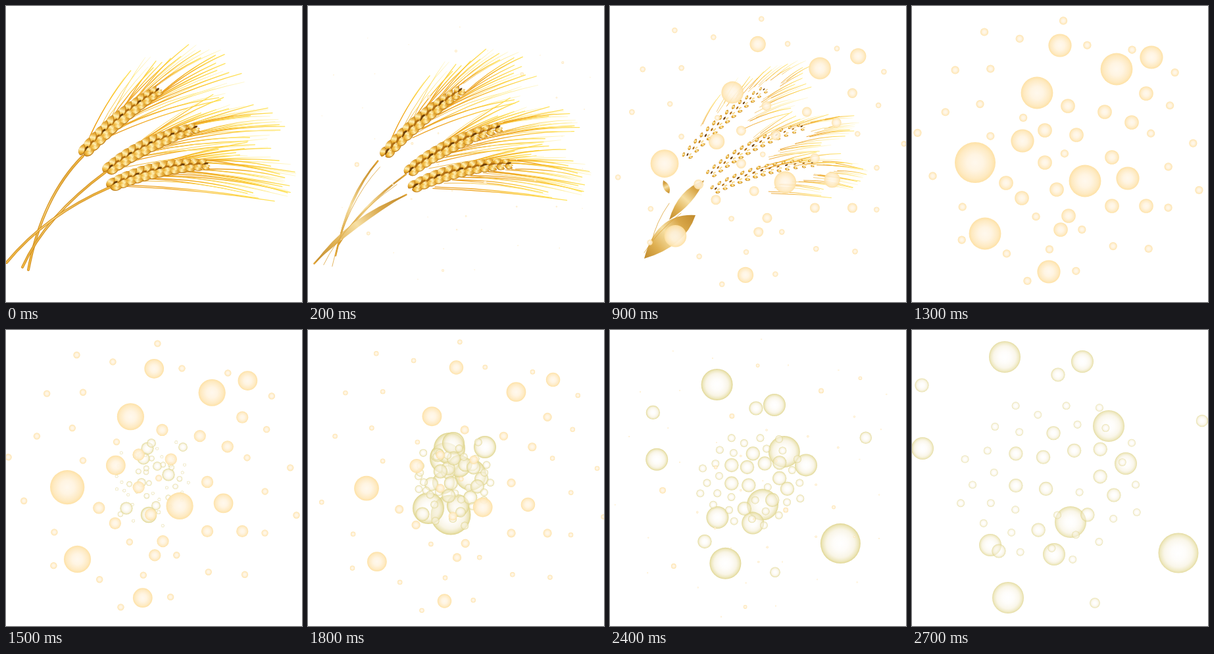
These frames come from a looping animation (450x450 px, 2.8 s). An HTML page with a canvas:

```html
<!DOCTYPE html>
<html>
<head>
<meta charset="utf-8">
<title>Wheat and bubbles</title>
<style>
html, body { margin: 0; width: 100%; height: 100%; overflow: hidden; background: #fff; }
canvas { display: block; }
</style>
</head>
<body>
<canvas id="stage" width="450" height="450"></canvas>
<script>
const ctx = document.getElementById('stage').getContext('2d');
const LOOP = 2800, STEP = 100;
const GOLDEN = Math.PI * (3 - Math.sqrt(5));

const lerp = (a, b, k) => a + (b - a) * k;
const clamp = v => Math.max(0, Math.min(1, v));
const quad = (a, c, b, k) => lerp(lerp(a, c, k), lerp(c, b, k), k);
const quadPoint = (p, k) => [quad(p[0], p[2], p[4], k), quad(p[1], p[3], p[5], k)];

// Piecewise linear interpolation; values run on past both ends.
function track(times, rows, t) {
  let i = 0;
  while (i < times.length - 2 && t > times[i + 1]) i++;
  const k = (t - times[i]) / (times[i + 1] - times[i]);
  return rows[i].map((v, j) => lerp(v, rows[i + 1][j], k));
}

function seeded(seed) {
  return () => {
    seed = (seed * 16807) % 2147483647;
    return seed / 2147483647;
  };
}

function radial(stops) {
  const g = ctx.createRadialGradient(0, 0, 0, 0, 0, 1);
  stops.forEach(([at, color]) => g.addColorStop(at, color));
  return g;
}

function linear(x0, y0, x1, y1, colors) {
  const g = ctx.createLinearGradient(x0, y0, x1, y1);
  colors.forEach((c, i) => g.addColorStop(i / (colors.length - 1), c));
  return g;
}

function bubble(x, y, r, fill) {
  if (r <= 0.1) return;
  ctx.save();
  ctx.translate(x, y);
  ctx.scale(r, r);
  ctx.fillStyle = fill;
  ctx.beginPath();
  ctx.arc(0, 0, 1, 0, Math.PI * 2);
  ctx.fill();
  ctx.restore();
}

// ---- wheat ----

// Axis of each ear (base, control, tip) and the arc on which its awns end.
const ears = [
  { axis: [116, 226, 170, 167, 232, 128], fan: [195, 72, 368, 34, 372, 132], seed: 11 },
  { axis: [152, 252, 209, 207, 290, 185], fan: [300, 135, 480, 160, 400, 218], seed: 29 },
  { axis: [157, 275, 224, 242, 306, 241], fan: [370, 200, 494, 275, 415, 298], seed: 47 }
];
const AWNS = 36, GRAINS = 13;

const grainFill = linear(-10, 2, 10, -2, ['#c98616', '#f0b83e', '#fff0b4', '#e9b040', '#d1901f']);

function leaf(length, width) {
  ctx.beginPath();
  ctx.moveTo(-length / 2, 0);
  ctx.bezierCurveTo(-length / 3, -width * 0.75, length / 5, -width * 0.7, length / 2, 0);
  ctx.bezierCurveTo(length / 5, width * 0.7, -length / 3, width * 0.75, -length / 2, 0);
  ctx.fill();
}

function axisPose(p, k) {
  const [x, y] = quadPoint(p, k);
  const dx = lerp(p[2] - p[0], p[4] - p[2], k);
  const dy = lerp(p[3] - p[1], p[5] - p[3], k);
  return { x, y, angle: Math.atan2(dy, dx) };
}

function stamp(pose, along, across, turn, scale, draw) {
  ctx.save();
  ctx.translate(pose.x, pose.y);
  ctx.rotate(pose.angle);
  ctx.translate(along, across);
  ctx.rotate(turn);
  ctx.scale(scale, scale);
  draw();
  ctx.restore();
}

function drawAwns(axis, ear, scale) {
  const rnd = seeded(ear.seed * 7919);
  for (let i = 0; i < AWNS; i++) {
    const v = clamp((i + rnd() * 0.9) / AWNS);
    const root = 0.2 + 0.8 * (1 - Math.abs(2 * v - 1));
    const pose = axisPose(axis, clamp(root + (rnd() - 0.5) * 0.3));
    const side = v < 0.5 ? -7 : 7;
    const x0 = pose.x - Math.sin(pose.angle) * side;
    const y0 = pose.y + Math.cos(pose.angle) * side;
    const end = quadPoint(ear.fan, v);
    const reach = 0.72 + rnd() * 0.32;
    const x1 = lerp(x0, end[0], reach), y1 = lerp(y0, end[1], reach);
    const mx = (x0 + x1) / 2, my = (y0 + y1) / 2;
    const bend = 0.02 + rnd() * 0.06;
    const at = (x, y) => [lerp(mx, x, scale), lerp(my, y, scale)];
    const a = at(x0, y0), b = at(x1, y1);
    const c = at(mx + (y1 - y0) * bend, my - (x1 - x0) * bend);
    const strong = rnd() < 0.4;
    ctx.strokeStyle = linear(a[0], a[1], b[0], b[1], strong
      ? ['#e99a18', '#f0a51e', '#fbc62d', '#ffe45c']
      : ['#eaa52a', '#f8c63a', '#ffe46a', '#fff8cf']);
    ctx.lineWidth = (strong ? 1.35 : 0.95) * (0.4 + 0.6 * scale);
    ctx.beginPath();
    ctx.moveTo(...a);
    ctx.quadraticCurveTo(...c, ...b);
    ctx.stroke();
  }
}

function drawGrains(axis, scale) {
  for (let i = GRAINS - 1; i >= 0; i--) {
    const k = (i + 0.6) / GRAINS;
    const pose = axisPose(axis, k);
    const taper = 0.62 + 0.38 * Math.sin(Math.PI * Math.min(1, k * 0.75 + 0.2));
    const size = scale * taper;
    stamp(pose, 2, -1, -0.25, size, () => {
      ctx.fillStyle = i % 3 ? '#b06d12' : '#6b3d08';
      leaf(15, 6);
    });
    for (const side of [-1, 1]) {
      stamp(pose, side * 2, side * 6.2 * taper, side * 0.42, size, () => {
        ctx.fillStyle = '#c17f17';
        leaf(21, 10.5);
        ctx.translate(0.4, -0.7);
        ctx.fillStyle = grainFill;
        leaf(19.5, 9);
      });
    }
    stamp(pose, 5, 2, 0.1, size, () => {
      ctx.fillStyle = grainFill;
      leaf(13, 6);
    });
  }
}

// Stems: start, control, end and bulge at each key time; finally they collapse.
const stemTimes = [0, 500, 900, 1300];
const stems = [
  [[117, 228, 55, 290, 34, 401, 1], [90, 247, 70, 285, 54, 347, 9], [81, 265, 86, 276, 90, 285, 9]],
  [[152, 252, 60, 320, 25, 397, 1], [144, 262, 110, 285, 75, 317, 9], [143, 265, 116, 290, 90, 325, 17]],
  [[157, 276, 60, 318, 1, 390, 1], [138, 303, 78, 338, 22, 394, 22], [130, 318, 92, 340, 52, 384, 34]]
];
const hairs = [
  [stems[0][0], [98, 270, 62, 315, 41, 388], [90, 300, 70, 328, 63, 360]],
  [stems[1][0], [110, 300, 50, 338, 22, 388], [108, 315, 70, 345, 52, 375]]
];
for (const keys of [...stems, ...hairs]) {
  const [x, y] = quadPoint(keys[2], 0.5);
  keys.push([x, y, x, y, x, y, 0]);
}

function strokeCurve([ax, ay, cx, cy, bx, by], color, width) {
  ctx.strokeStyle = color;
  ctx.lineWidth = width;
  ctx.beginPath();
  ctx.moveTo(ax, ay);
  ctx.quadraticCurveTo(cx, cy, bx, by);
  ctx.stroke();
}

function drawStems(t) {
  ctx.lineCap = 'round';
  for (const keys of stems) {
    const curve = track(stemTimes, keys, t);
    const [ax, ay, cx, cy, bx, by, w] = curve;
    const len = Math.hypot(bx - ax, by - ay) || 1;
    const nx = (by - ay) / len * w, ny = (ax - bx) / len * w;
    const line = 1 - t / 500;
    if (line > 0) {
      strokeCurve(curve, '#d28d1c', 4 * line);
      strokeCurve(curve, '#f4bd48', 2 * line);
    }
    ctx.fillStyle = linear(ax, ay, bx, by, ['#c08a2c', '#d8a648', '#f6dfa4', '#dfb052', '#c08a2c']);
    ctx.beginPath();
    ctx.moveTo(ax, ay);
    ctx.quadraticCurveTo(cx + nx, cy + ny, bx, by);
    ctx.quadraticCurveTo(cx - nx, cy - ny, ax, ay);
    ctx.fill();
  }
  if (t > 0)
    for (const keys of hairs) strokeCurve(track(stemTimes, keys.map(k => k.slice(0, 6)), t), '#dca43a', 0.8);
}

function drawWheat(t) {
  if (t >= 1300) return;
  const scale = Math.pow(1 - t / 1300, 0.8);
  const drift = clamp(t / 500);
  drawStems(t);
  for (const ear of ears) {
    const p = ear.axis;
    const axis = [p[0] - 4 * drift, p[1] + 8 * drift, p[2], p[3], p[4] + 5 * drift, p[5] - 2 * drift];
    drawAwns(axis, ear, scale);
    drawGrains(axis, scale);
  }
}

// ---- amber bubbles: radius, then x, y pairs at their largest ----

const amber = [
  [31, 96, 238],
  [24.4, 190, 132, 311, 96, 263, 266, 111, 346],
  [17.6, 225, 60, 364, 78, 168, 205, 328, 262, 208, 404],
  [10.8, 356, 133, 237, 152, 293, 161, 334, 177, 202, 189, 250, 196, 202, 238, 304, 230,
    220, 279, 143, 269, 167, 292, 304, 304, 356, 304, 238, 319, 226, 340]
];

// Small ones spiral outwards through the gaps between the large ones.
function scatterAmber() {
  const all = [];
  for (const [r, ...xy] of amber)
    for (let i = 0; i < xy.length; i += 2) all.push([xy[i], xy[i + 1], r]);
  for (let i = 0; all.length < 56; i++) {
    const far = 12 + 31 * Math.sqrt(i), a = i * GOLDEN + 0.6;
    const x = 222 + far * Math.cos(a), y = 218 + far * 0.93 * Math.sin(a);
    if (all.every(([bx, by, r]) => Math.hypot(bx - x, by - y) > r + 12)) all.push([x, y, 6.1]);
  }
  return all;
}
const amberBubbles = scatterAmber();

const amberFill = radial([
  [0, 'rgba(255,247,234,.86)'], [0.4, 'rgba(255,243,222,.88)'],
  [0.8, 'rgba(254,232,188,.9)'], [1, 'rgba(254,223,158,.92)']
]);

// Origin and stretch of the whole cloud, and its bubble size.
const cloudTimes = [500, 900, 1300, 1800, 2200];
const cloud = [
  [78, 64, 1.138, 0.991, 0.36],
  [83, 58, 1.098, 1.02, 0.69],
  [96, 60, 1, 1, 1],
  [89, 57, 1.058, 1.032, 0.61],
  [83, 55, 1.1, 1.055, 0.31]
];

function drawAmber(t) {
  const [ox, oy, sx, sy, size] = track(cloudTimes, cloud, t);
  for (const [x, y, r] of amberBubbles)
    bubble(ox + (x - 96) * sx, oy + (y - 60) * sy, r * size, amberFill);
}

// ---- olive bubbles: radius, then start, midway and end points ----

const oliveTimes = [1800, 2200, 2700];
const olive = [
  [30.5, 217, 281, 314, 315, 405, 339],
  [24, 209, 195, 177, 111, 141, 41],
  [24, 247, 220, 242, 211, 299, 146],
  [24, 215, 180, 226, 248, 241, 292],
  [24, 183, 271, 195, 320, 146, 407],
  [17, 221, 172, 244, 158, 259, 48],
  [17, 269, 178, 280, 207, 325, 203],
  [17, 206, 232, 108, 208, 16, 180],
  [17, 230, 207, 193, 257, 119, 327],
  [17, 228, 267, 218, 262, 216, 341],
  [10.6, 197, 190, 99, 153, 15, 84],
  [10.6, 213, 216, 222, 153, 222, 68],
  [10.6, 174, 280, 152, 312, 132, 336],
  [9.2, 250, 205, 354, 181, 441, 138],
  [7.8, 232, 277, 233, 337, 278, 415]
];

// The rest gather around the middle, then spread in a spiral.
function scatterOlive() {
  const rnd = seeded(5381);
  const all = olive.map(([r, ...p]) => ({ r, keys: [p.slice(0, 2), p.slice(2, 4), p.slice(4)] }));
  for (let i = 0; i < 40; i++) {
    const a = i * GOLDEN + 2, far = 20 + 20.5 * Math.sqrt(i);
    const dx = far * Math.cos(a), dy = far * 0.85 * Math.sin(a);
    const first = 0.3 + rnd() * 0.3;
    all.push({
      r: i < 16 && i % 3 < 2 ? 10.6 : 5.9,
      keys: [[220 + dx * first, 228 + dy * first], [218 + dx * 0.28, 228 + dy * 0.28], [212 + dx, 226 + dy]]
    });
  }
  return all;
}
const oliveBubbles = scatterOlive();

const oliveFill = radial([
  [0, 'rgba(255,255,255,.4)'], [0.35, 'rgba(253,250,243,.5)'],
  [0.7, 'rgba(245,238,214,.65)'], [0.9, 'rgba(231,222,164,.82)'], [1, 'rgba(219,207,128,.92)']
]);

function drawOlive(t) {
  const size = clamp((t - 1300) / 500);
  if (!size) return;
  ctx.globalAlpha = 1 - 0.2 * clamp((t - 2200) / 500);
  for (const { r, keys } of oliveBubbles) {
    const [x, y] = track(oliveTimes, keys, Math.max(t, 1800));
    bubble(x, y, r * size, oliveFill);
  }
  ctx.globalAlpha = 1;
}

function render(now) {
  const t = Math.floor((now % LOOP) / STEP) * STEP;
  ctx.fillStyle = '#fff';
  ctx.fillRect(0, 0, 450, 450);
  drawWheat(t);
  drawOlive(t);
  drawAmber(t);
}

let start = null;
function tick(now) {
  if (start === null) start = now;
  render(Math.max(0, now - start));
  requestAnimationFrame(tick);
}
render(0);
requestAnimationFrame(tick);
</script>
</body>
</html>
```
